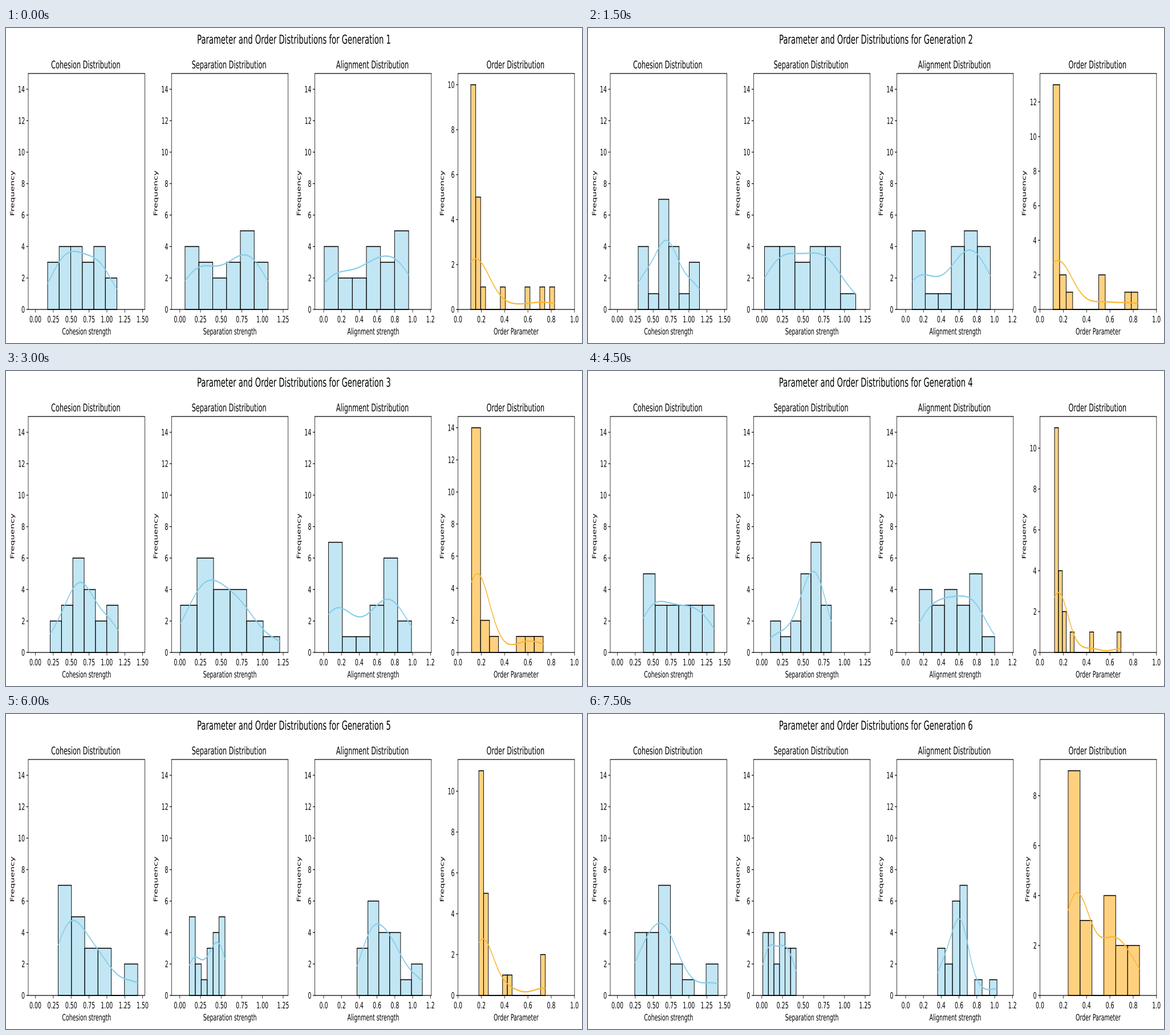
Write a matplotlib script that moves like this. It is 1010 px wide and 554 px high and loops after 8000 ms.

```python
import numpy as np
import matplotlib.pyplot as plt
from matplotlib.animation import FuncAnimation
from matplotlib.patches import PathPatch, Polygon
from matplotlib.textpath import TextPath
from matplotlib.transforms import Affine2D

W, H = 1010, 554
SX, SY = 0.678, 1.118      # the whole chart is squeezed sideways and stretched upwards
PT = 100 / 72              # chart pixels per point
TOP, BOTTOM, PANEL_W = 80.0, 495.0, 204.4
TICK = 3.5 * PT
SKY, ORANGE = "#87ceeb", "#ffa500"


def bins(size, **filled):
    """Counts of a sparse histogram: b0=10 puts ten values in bin 0."""
    return [filled.get(f"b{i}", 0) for i in range(size)]


# Per generation: lowest value, highest value, counts of the equal bins between
COHESION = [
    (.171, 1.140, [3, 4, 4, 3, 4, 2]),
    (.291, 1.148, [4, 1, 7, 4, 1, 3]),
    (.207, 1.156, [2, 3, 6, 4, 2, 3]),
    (.363, 1.352, [5, 3, 3, 3, 3, 3]),
    (.319, 1.431, [7, 5, 3, 3, 0, 2]),
    (.243, 1.407, [4, 4, 7, 2, 1, 0, 2]),
]
SEPARATION = [
    (.063, 1.067, [4, 3, 2, 3, 5, 3]),
    (.032, 1.136, [4, 4, 3, 4, 4, 1]),
    (.008, 1.208, [3, 6, 4, 4, 2, 1]),
    (.105, .839, [2, 1, 2, 5, 7, 3]),
    (.115, .546, [5, 2, 1, 3, 4, 5]),
    (.012, .415, [4, 4, 2, 4, 3, 3]),
]
ALIGNMENT = [
    (.006, .955, [4, 2, 2, 4, 3, 5]),
    (.074, .952, [5, 1, 1, 4, 5, 4]),
    (.054, .987, [7, 1, 1, 3, 6, 2]),
    (.154, 1.000, [4, 3, 4, 3, 5, 1]),
    (.375, 1.109, [3, 6, 4, 4, 1, 2]),
    (.359, 1.026, [3, 2, 6, 7, 0, 1, 0, 1]),
]
ORDER = [
    (.110, .829, bins(17, b0=10, b1=5, b2=1, b6=1, b11=1, b14=1, b16=1)),
    (.113, .839, bins(13, b0=13, b1=2, b2=1, b7=2, b11=1, b12=1)),
    (.117, .731, bins(8, b0=14, b1=2, b2=1, b5=1, b6=1, b7=1)),
    (.125, .695, bins(17, b0=11, b1=4, b2=2, b4=1, b9=1, b16=1)),
    (.179, .749, bins(14, b0=11, b1=5, b5=1, b6=1, b13=2)),
    (.242, .854, bins(6, b0=9, b1=3, b3=4, b4=2, b5=2)),
]

# name, x label, left edge, x limits, tick step, tick format, bar and line colours, data
PANELS = [
    ("Cohesion", "Cohesion strength", 39.0, (-.1, 1.53), .25, "%.2f", SKY, SKY, COHESION),
    ("Separation", "Separation strength", 290.3, (-.1, 1.31), .25, "%.2f", SKY, SKY, SEPARATION),
    ("Alignment", "Alignment strength", 541.4, (-.1, 1.21), .2, "%.1f", SKY, SKY, ALIGNMENT),
    ("Order", "Order Parameter", 792.5, (0, 1), .2, "%.1f", ORANGE, "#fcb733", ORDER),
]

fig = plt.figure(figsize=(W / 128, H / 128), dpi=128, facecolor="white")
ax = fig.add_axes([0, 0, 1, 1])
ax.set(xlim=(0, W), ylim=(H, 0))
ax.axis("off")


def text(x, y, s, pt, align="center", turn=0):
    """Text on baseline y, or on baseline x when turned."""
    path = TextPath((0, 0), s, size=pt * PT, prop={"family": "DejaVu Sans"})
    box = path.get_extents()
    shift = -box.x1 if align == "right" else -(box.x0 + box.x1) / 2
    place = Affine2D().translate(shift, 0).rotate_deg(turn).scale(SX, -SY).translate(x, y)
    return ax.add_patch(PathPatch(place.transform_path(path), fc="black", lw=0,
                                  snap=False, zorder=4))


def shape(points, color, z):
    return ax.add_patch(Polygon(points, closed=True, fc=color, lw=0, snap=False, zorder=z))


def rect(x0, y0, x1, y1, color, z):
    return shape([(x0, y0), (x1, y0), (x1, y1), (x0, y1)], color, z)


def hline(x0, x1, y, pt, z):
    h = pt * PT * SY / 2
    return rect(x0, y - h, x1, y + h, "black", z)


def vline(x, y0, y1, pt, z):
    h = pt * PT * SX / 2
    return rect(x - h, y0, x + h, y1, "black", z)


def frame(x0, y0, x1, y1, pt, z):
    h = pt * PT * SX / 2
    return [hline(x0 - h, x1 + h, y0, pt, z), hline(x0 - h, x1 + h, y1, pt, z),
            vline(x0, y0, y1, pt, z), vline(x1, y0, y1, pt, z)]


def ribbon(x, y, pt, color, z):
    """A pen stroke squeezed along with the chart."""
    dx, dy = np.gradient(x / SX), np.gradient(y / SY)
    size = np.hypot(dx, dy)
    h = pt * PT / 2
    ox, oy = -dy / size * h * SX, dx / size * h * SY
    side = np.column_stack([x + ox, y + oy])
    back = np.column_stack([x - ox, y - oy])[::-1]
    return shape(np.vstack([side, back]), color, z)


def density(edges, counts, at):
    """Gaussian density scaled to counts, with values spread evenly in each bin."""
    width = edges[1] - edges[0]
    values = np.concatenate([e + width * (np.arange(n) + .5) / n
                             for e, n in zip(edges, counts) if n])
    values[0], values[-1] = edges[0], edges[-1]
    band = values.std(ddof=1) * len(values) ** -.2
    bells = np.exp(-((at[:, None] - values) / band) ** 2 / 2)
    return bells.sum(axis=1) * width / (band * np.sqrt(2 * np.pi))


def y_axis(left, top):
    """Even ticks, their labels and the axis name."""
    parts = []
    last = int(top // 2) * 2
    for v in range(0, last + 1, 2):
        y = BOTTOM - v * (BOTTOM - TOP) / top
        parts += [hline(left - TICK * SX, left, y, .8, 3),
                  text(left - 2 * TICK * SX, y + 5.6, str(v), 10, "right")]
    indent = 12.7 + 6 * len(str(last))
    parts.append(text(left - indent, 290, "Frequency", 10, turn=90))
    return parts


def histogram(left, limits, fill, line, row, top):
    lo, hi, counts = row
    unit = PANEL_W / (limits[1] - limits[0])
    scale = (BOTTOM - TOP) / top
    edges = left + (np.linspace(lo, hi, len(counts) + 1) - limits[0]) * unit
    parts = []
    for x0, x1, n in zip(edges, edges[1:], counts):
        y = BOTTOM - n * scale
        parts.append(rect(x0, y, x1, BOTTOM, (fill, .5), 1))
        parts += frame(x0, y, x1, BOTTOM, 1, 1.5)
    x = np.linspace(edges[0], edges[-1], 200)
    parts.append(ribbon(x, BOTTOM - density(edges, counts, x) * scale, 1.5, line, 2))
    return parts


for name, label, left, (x_min, x_max), step, fmt, _, _, rows in PANELS:
    mid = left + PANEL_W / 2
    frame(left, TOP, left + PANEL_W, BOTTOM, .8, 3)
    text(mid - 1.5, 71, name + " Distribution", 12)
    text(mid, 539, label, 10)
    for i in range(int(x_max / step + 1e-6) + 1):
        x = left + (i * step - x_min) * PANEL_W / (x_max - x_min)
        vline(x, BOTTOM, BOTTOM + TICK * SY, .8, 3)
        text(x, 517.7, fmt % (i * step), 10)
    if rows is not ORDER:
        y_axis(left, 15)

live = []


def update(i):
    while live:
        live.pop().remove()
    g = i // 3
    live.append(text(505, 27.6, f"Parameter and Order Distributions for Generation {g + 1}", 14))
    for _, _, left, limits, _, _, fill, line, rows in PANELS:
        top = 15
        if rows is ORDER:
            top = max(rows[g][2]) * 1.05
            live.extend(y_axis(left, top))
        live.extend(histogram(left, limits, fill, line, rows[g], top))
    return live


anim = FuncAnimation(fig, update, frames=16, interval=500, repeat=True,
                     repeat_delay=0, init_func=lambda: [], blit=False)
plt.show()
```
